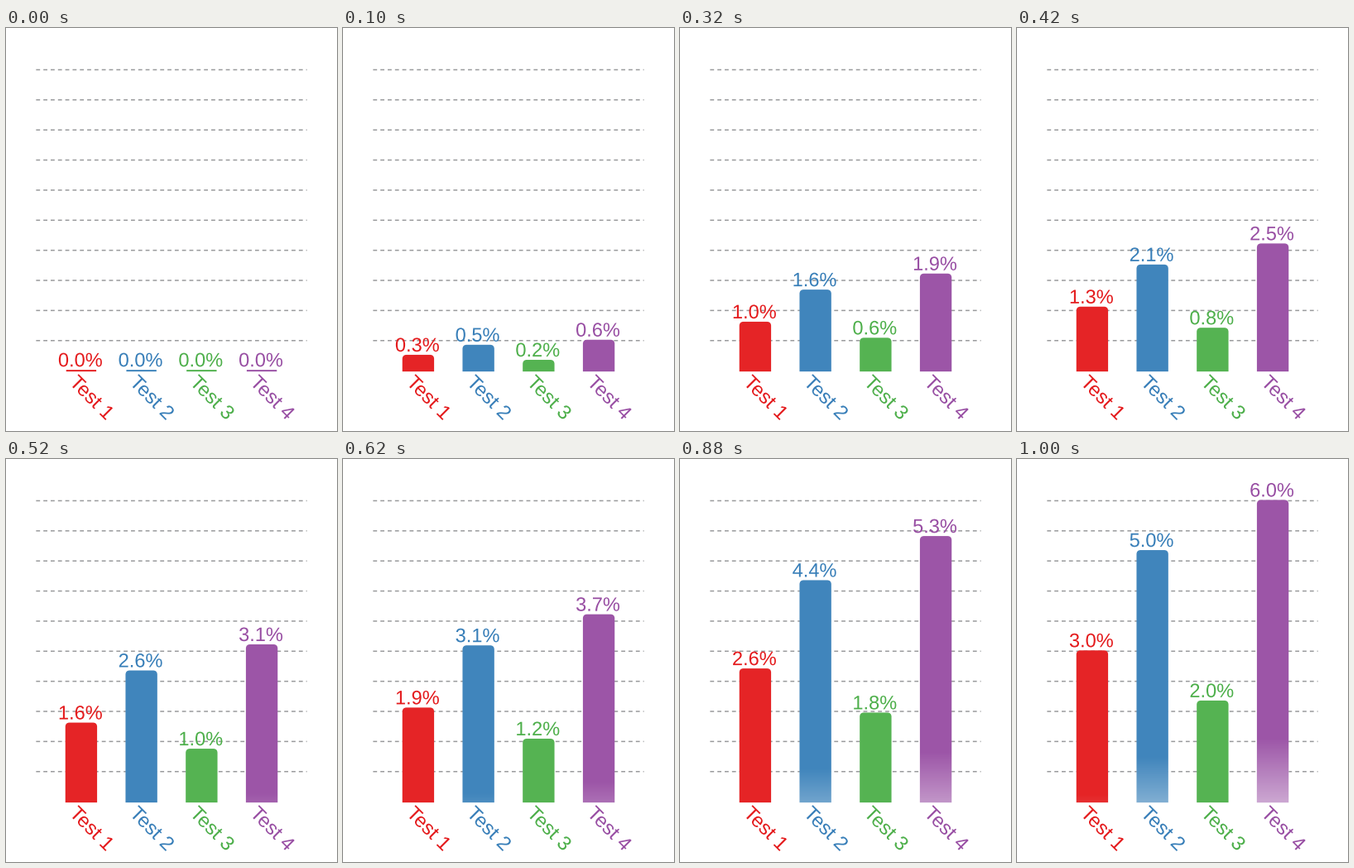
Animation of 400 by 487 pixels, one loop 1.02 s. Source, as a matplotlib script:

```python
import matplotlib.pyplot as plt
import numpy as np
from matplotlib.animation import FuncAnimation
from matplotlib.patches import PathPatch
from matplotlib.path import Path
from matplotlib.textpath import TextPath
from matplotlib.transforms import Affine2D

W, H, DPI = 400, 487, 100
FRAMES, INTERVAL = 51, 20
PX = 72 / DPI
UNIT = W / 11
BASE = 414.1
SCALE = 10 * UNIT / 6
RADIUS = 4
FADE_FROM, FADE_RATE, FADE_SLOPE = 2.6, 23, 0.0062
FONT = {"family": "Liberation Sans"}

BARS = [
    ("Test 1", 3, "#e41a1c", "#e52426"),
    ("Test 2", 5, "#377eb8", "#4085bc"),
    ("Test 3", 2, "#4daf4a", "#55b352"),
    ("Test 4", 6, "#984ea3", "#9c55a7"),
]


def text_path(text, x, y, size, angle=0):
    place = Affine2D().scale(1, -1).rotate_deg(angle).translate(x, y)
    return TextPath((0, 0), text, size=size, prop=FONT).transformed(place)


def bar_path(x, top):
    right = x + UNIT
    r = min(RADIUS, BASE - top)
    points = [(x, BASE), (x, top + r), (x, top), (x + r, top),
              (right - r, top), (right, top), (right, top + r),
              (right, BASE), (x, BASE)]
    codes = [Path.MOVETO, Path.LINETO, Path.CURVE3, Path.CURVE3,
             Path.LINETO, Path.CURVE3, Path.CURVE3,
             Path.LINETO, Path.CLOSEPOLY]
    return Path(points, codes)


def add_patch(path, color, width=0, z=3):
    patch = PathPatch(path, facecolor=color, edgecolor=color if width else "none",
                      linewidth=width * PX, joinstyle="miter", capstyle="butt",
                      zorder=z, snap=False)
    return ax.add_patch(patch)


class Bar:
    def __init__(self, i, name, goal, ink, fill):
        self.x = 2 * UNIT * (i + 1)
        self.goal = goal
        self.body = add_patch(bar_path(self.x, BASE), fill, 2, 2)
        self.value = add_patch(text_path("0.0%", self.x, BASE, 23.6), ink, z=4)
        add_patch(text_path(name, self.x + 3, 429.5, 24, 45), ink, z=4)
        self.fade = ax.imshow(np.ones((64, 1, 4)), origin="upper", aspect="auto",
                              interpolation="bilinear", zorder=3)

    def update(self, t):
        v = self.goal * t
        top = BASE - v * SCALE
        self.body.set_path(bar_path(self.x, top))
        self.value.set_path(text_path(f"{v:.1f}%", self.x - 9.8, top - 5, 23.6))

        length = FADE_RATE * (v - FADE_FROM)
        self.fade.set_visible(length > 1)
        if length > 1:
            veil = np.ones((64, 1, 4))
            veil[:, 0, 3] = np.linspace(0, length * FADE_SLOPE, 64)
            self.fade.set_data(veil)
            bottom = BASE + 1.4
            self.fade.set_extent((self.x - 1, self.x + UNIT + 1,
                                  bottom, bottom - length))


fig = plt.figure(figsize=(W / DPI, H / DPI), dpi=DPI, facecolor="white")
ax = fig.add_axes([0, 0, 1, 1])

for k in range(10):
    y = BASE - (k + 1) * UNIT
    ax.plot([UNIT, 10 * UNIT], [y, y], color="#999a9c", lw=1.5 * PX,
            dashes=(4.8 / 1.5, 4.02 / 1.5), dash_capstyle="butt",
            snap=False, zorder=1)

bars = [Bar(i, *spec) for i, spec in enumerate(BARS)]
ax.set_xlim(0, W)
ax.set_ylim(H, 0)
ax.axis("off")


def draw(n):
    for bar in bars:
        bar.update(n / (FRAMES - 1))
    ax.set_xlim(0, W)
    ax.set_ylim(H, 0)
    return []


anim = FuncAnimation(fig, draw, frames=FRAMES, interval=INTERVAL,
                     repeat=True, repeat_delay=0, blit=False)
plt.show()
```
